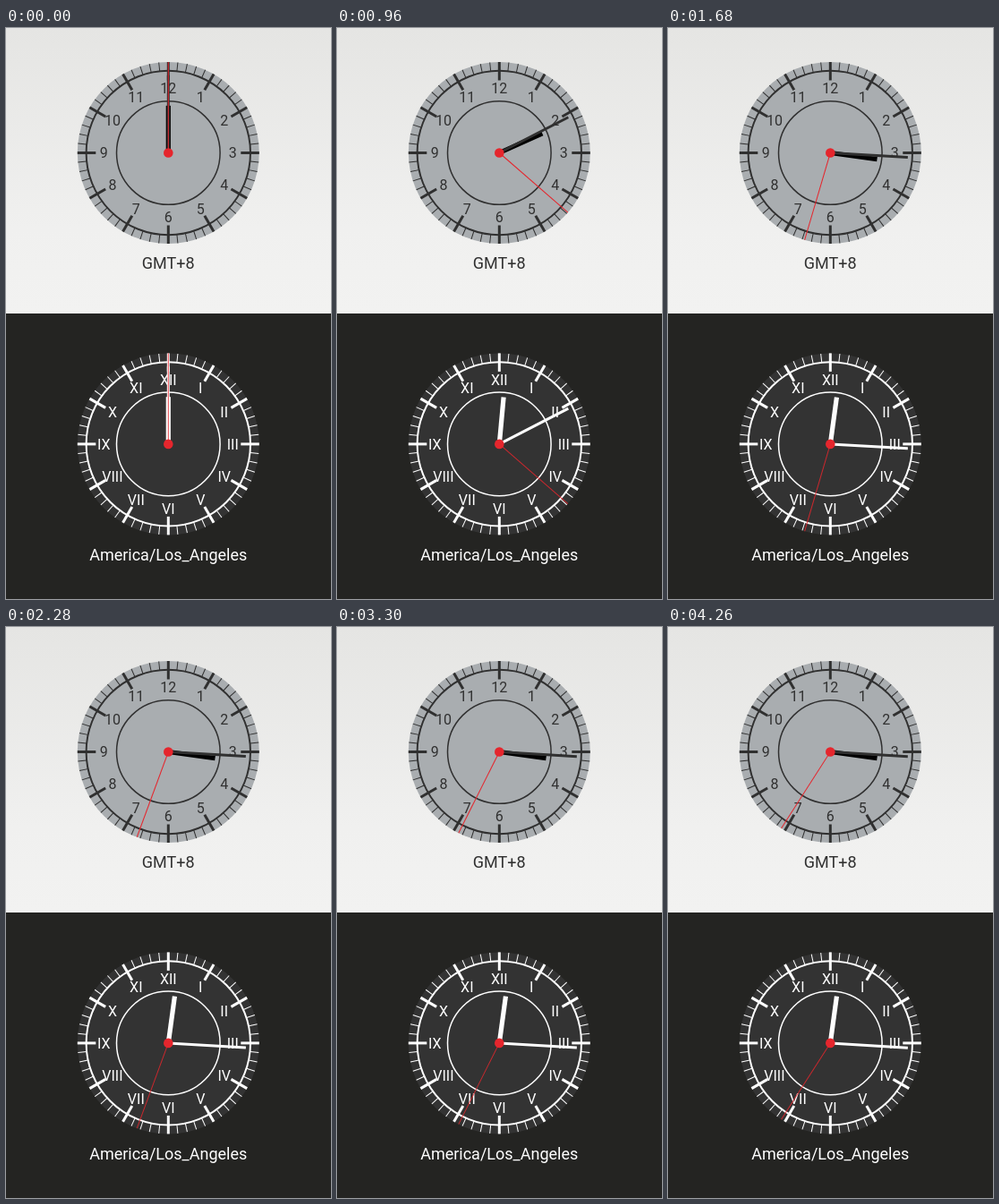
An HTML page with a canvas that plays this animation: 363x638 px, repeating every 4320 ms.

```html
<!DOCTYPE html>
<html>
<head>
<meta charset="utf-8">
<style>
html, body { margin: 0; width: 363px; height: 638px; overflow: hidden; }
canvas { display: block; }
</style>
</head>
<body>
<canvas id="stage" width="363" height="638"></canvas>
<script>
const ctx = document.getElementById('stage').getContext('2d');
const LOOP = 4320, STEP = 60, RED = '#e5262d', TAU = Math.PI * 2;
const INTRO_END = 1440, START_SECOND = 194.9;

// Progress of the opening sweep as [time, fraction], before easing.
const sweep = [[240, 0], [540, .236], [780, .467], [960, .612], [1320, .907], [INTRO_END, 1]];

const clocks = [
  { y: 139.5, face: '#a9adb0', ink: '#303030', hourInk: '#000', hour: 90, secondAlpha: 1,
    label: 'GMT+8', labelY: 269, numerals: '12 1 2 3 4 5 6 7 8 9 10 11' },
  { y: 464.9, face: '#333', ink: '#fff', hourInk: '#fff', hour: 0, secondAlpha: .85,
    label: 'America/Los_Angeles', labelY: 594.5, numerals: 'XII I II III IV V VI VII VIII IX X XI' }
];

function progress(t) {
  if (t <= sweep[0][0]) return 0;
  const i = sweep.findIndex(([time]) => time >= t);
  if (i < 0) return 1;
  const [t0, p0] = sweep[i - 1], [t1, p1] = sweep[i];
  return p0 + (p1 - p0) * (t - t0) / (t1 - t0);
}

function spoke(angle, from, to, width, color) {
  ctx.save();
  ctx.rotate(angle * Math.PI / 180);
  ctx.fillStyle = color;
  ctx.fillRect(-width / 2, -to, width, to - from);
  ctx.restore();
}

function circle(radius) {
  ctx.beginPath();
  ctx.arc(0, 0, radius, 0, TAU);
}

function ring(radius, width, color) {
  circle(radius);
  ctx.lineWidth = width;
  ctx.strokeStyle = color;
  ctx.stroke();
}

function disc(radius, color) {
  circle(radius);
  ctx.fillStyle = color;
  ctx.fill();
}

function drawFace(clock) {
  disc(101.5, clock.face);
  for (let i = 0; i < 60; i++) {
    if (i % 5) spoke(i * 6, 92, 101.5, 1, clock.ink);
    else spoke(i * 6, 81, 101.5, 3, clock.ink);
  }
  ring(91.7, 2, clock.ink);
  ring(57.8, 1.5, clock.ink);

  ctx.fillStyle = clock.ink;
  ctx.font = '16px Roboto, sans-serif';
  clock.numerals.split(' ').forEach((text, i) => {
    const a = i * TAU / 12;
    ctx.fillText(text, 72 * Math.sin(a), -72 * Math.cos(a) + 5.7);
  });
}

function drawHands(clock, t) {
  const eased = .5 - .5 * Math.cos(Math.PI * progress(t));
  const second = START_SECOND + Math.max(0, t - INTRO_END) * .0063;
  const minute = 90 + second / 60;
  const hour = clock.hour + minute / 12;
  spoke(hour * eased, 0, 52.7, 5.2, clock.hourInk);
  spoke(minute * eased, 0, 86.7, 3, clock.ink);
  ctx.globalAlpha = clock.secondAlpha;
  spoke(second * eased, 0, 101.5, 1, RED);
  ctx.globalAlpha = 1;
  disc(5.3, RED);
}

function draw(t) {
  const light = ctx.createLinearGradient(0, 0, 0, 319);
  light.addColorStop(0, '#e5e5e3');
  light.addColorStop(.7, '#f0f0ef');
  light.addColorStop(1, '#f2f2f1');
  ctx.fillStyle = light;
  ctx.fillRect(0, 0, 363, 319);
  ctx.fillStyle = '#242422';
  ctx.fillRect(0, 319, 363, 319);
  ctx.textAlign = 'center';

  for (const clock of clocks) {
    ctx.save();
    ctx.translate(181.3, clock.y);
    drawFace(clock);
    drawHands(clock, t);
    ctx.restore();
    ctx.fillStyle = clock.ink;
    ctx.font = '18px Roboto, sans-serif';
    ctx.fillText(clock.label, 181.2, clock.labelY);
  }
}

const start = performance.now();
function tick() {
  const t = (performance.now() - start) % LOOP;
  draw(Math.floor(t / STEP) * STEP);
  requestAnimationFrame(tick);
}
tick();
</script>
</body>
</html>
```
